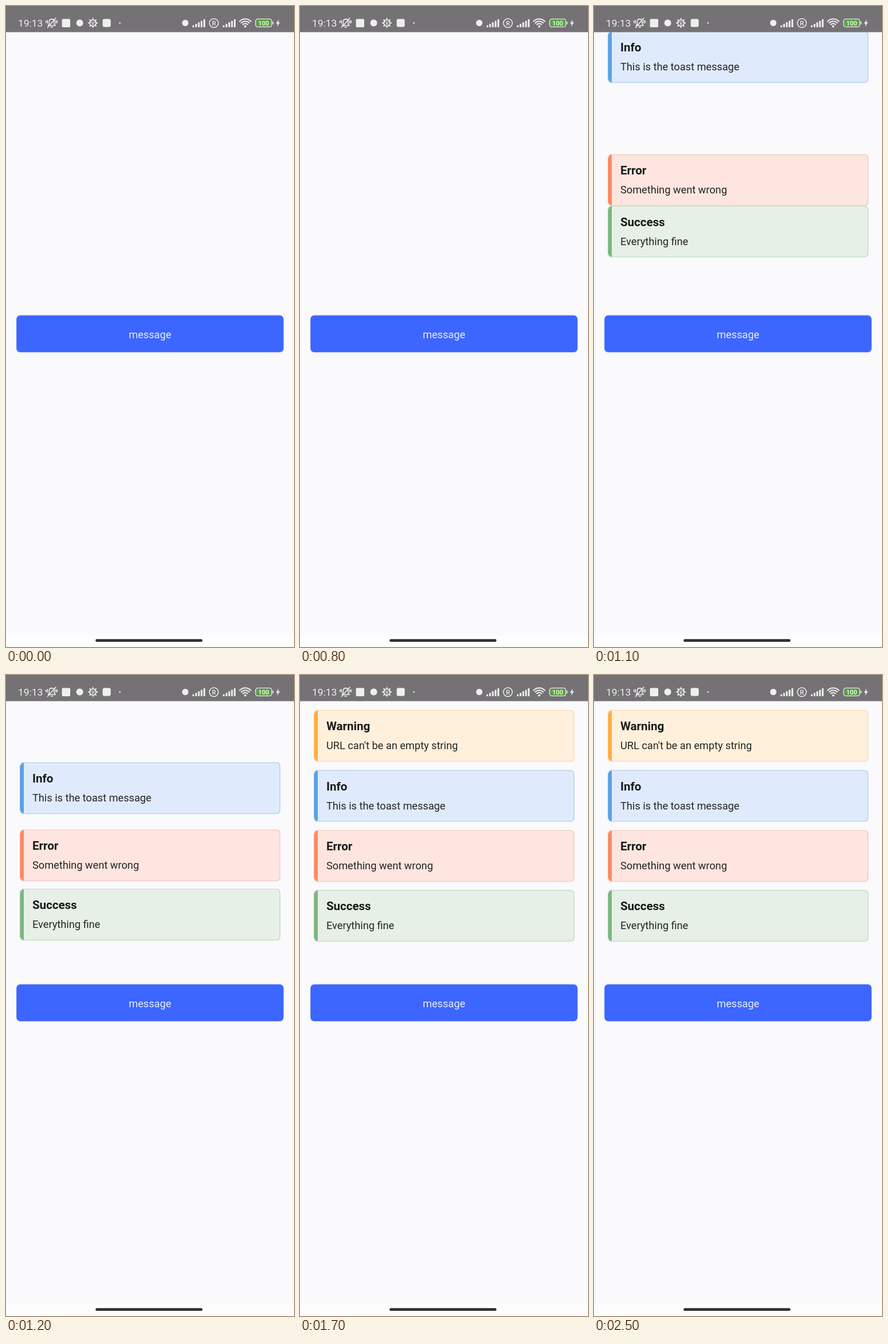
Animation, 502 px wide and 1115 px high, one loop 2.6 s. Source, as an HTML page with a canvas:

```html
<!DOCTYPE html>
<html lang="en">
<head>
<meta charset="utf-8">
<title>Toast messages</title>
<style>
  html, body { margin: 0; width: 100%; height: 100%; overflow: hidden; background: #faf9fc; }
  canvas { display: block; width: 502px; height: 1115px; }
</style>
</head>
<body>
<canvas id="stage"></canvas>
<script>
const W = 502, H = 1115, LOOP = 2600, STEP = 100;
const FONT = 'Roboto, Arial, sans-serif';
const canvas = document.getElementById('stage');
const ratio = window.devicePixelRatio || 1;
canvas.width = W * ratio;
canvas.height = H * ratio;
const ctx = canvas.getContext('2d');
ctx.scale(ratio, ratio);

// path: top edge at each step from `from` on; the last value is where it rests
const toasts = [
  { title: 'Success', text: 'Everything fine', fill: '#e6f0e7', bar: '#7cb681', edge: '#b9d9bc', from: 9, path: [112, 262, 347.5, 372, 374] },
  { title: 'Error', text: 'Something went wrong', fill: '#fee5df', bar: '#fb8a62', edge: '#efc5b0', from: 9, path: [-30, 149.5, 258, 269, 270] },
  { title: 'Info', text: 'This is the toast message', fill: '#dfebfd', bar: '#58a2e8', edge: '#a9cbea', from: 10, path: [-60, 44, 152, 165.5] },
  { title: 'Warning', text: "URL can't be an empty string", fill: '#fff0db', bar: '#ffad40', edge: '#f3d9ae', from: 12, path: [-52, 41, 59.5, 61] }
];

function box(x, y, w, h, r) {
  ctx.beginPath();
  ctx.roundRect(x, y, w, h, r);
}

function fillBox(x, y, w, h, r, color) {
  box(x, y, w, h, r);
  ctx.fillStyle = color;
  ctx.fill();
}

function disc(x, y, r) {
  ctx.beginPath();
  ctx.arc(x, y, r, 0, Math.PI * 2);
  ctx.fill();
}

function ring(x, y, r) {
  ctx.beginPath();
  ctx.arc(x, y, r, 0, Math.PI * 2);
  ctx.stroke();
}

function line(...pts) {
  ctx.beginPath();
  for (let i = 0; i < pts.length; i += 2) ctx.lineTo(pts[i], pts[i + 1]);
  ctx.stroke();
}

function label(str, x, y, size, color, weight = 400, align = 'left') {
  ctx.font = `${weight} ${size}px ${FONT}`;
  ctx.textAlign = align;
  ctx.fillStyle = color;
  ctx.fillText(str, x, y);
}

function drawToast(toast, step) {
  if (step < toast.from) return;
  const { path } = toast;
  const y = path[Math.min(step - toast.from, path.length - 1)];
  fillBox(24.5, y, 453.5, 89.5, 6, toast.fill);
  ctx.save();
  box(24.5, y, 453.5, 89.5, 6);
  ctx.clip();
  ctx.fillStyle = toast.bar;
  ctx.fillRect(24, y, 7, 90);
  ctx.restore();
  box(25, y + 0.5, 452.5, 88.5, 6);
  ctx.strokeStyle = toast.edge;
  ctx.lineWidth = 1.2;
  ctx.stroke();
  ctx.fillStyle = toast.bar;
  ctx.fillRect(24.5, y + 6, 6.5, 77.5);
  label(toast.title, 46, y + 35.3, 20.5, '#191919', 700);
  label(toast.text, 46, y + 68.3, 18.18, '#242424');
}

function drawBell() {
  ctx.lineWidth = 1.6;
  ctx.beginPath();
  ctx.moveTo(73.5, 34);
  ctx.lineTo(75.3, 31.5);
  ctx.lineTo(75.3, 27);
  ctx.bezierCurveTo(75.5, 21.5, 84, 21.5, 84.2, 27);
  ctx.lineTo(84.2, 31.5);
  ctx.lineTo(86, 34);
  ctx.closePath();
  ctx.stroke();
  line(78, 36.8, 81.5, 36.8);
  line(72.5, 37.5, 86.8, 21);
  line(72.2, 25, 72.2, 30);
  line(69.6, 26, 69.6, 29);
  line(87, 25, 87, 30);
  line(89.4, 26, 89.4, 29);
}

function drawGear() {
  ctx.lineWidth = 1.8;
  ring(151.5, 29.5, 5.4);
  for (let i = 0; i < 8; i++) {
    const a = i * Math.PI / 4, c = Math.cos(a), s = Math.sin(a);
    line(151.5 + c * 5.8, 29.5 + s * 5.8, 151.5 + c * 7.8, 29.5 + s * 7.8);
  }
  ctx.lineWidth = 1.2;
  line(147, 28, 156, 28);
  disc(151.5, 31, 1.6);
}

function drawSignal(x) {
  for (let i = 0; i < 5; i++) {
    const h = 3.5 + i * 2.6;
    fillBox(x + i * 4.8, 37 - h, 3, h, 1, '#f0eff0');
  }
}

function drawWifi() {
  ctx.lineWidth = 2.1;
  for (const r of [5.5, 9.5, 13.5]) {
    ctx.beginPath();
    ctx.arc(417, 36, r, -Math.PI * 0.76, -Math.PI * 0.24);
    ctx.stroke();
  }
  disc(417, 35.5, 2);
}

function drawBattery() {
  box(435.2, 22.6, 28, 13.8, 4);
  ctx.lineWidth = 1.4;
  ctx.stroke();
  fillBox(437.2, 24.6, 24, 9.8, 2.2, '#4cae2e');
  label('100', 449.2, 33.5, 11, '#f4fff0', 500, 'center');
  fillBox(464.6, 27, 1.7, 5, 0.8, '#e8e7e8');
  ctx.fillStyle = '#f0eff0';
  ctx.beginPath();
  for (const [x, y] of [[475.5, 23.5], [470.5, 30.5], [473.4, 30.5], [472.4, 36], [477.6, 28.6], [474.5, 28.6]]) ctx.lineTo(x, y);
  ctx.fill();
}

function drawStatusBar() {
  const ink = '#f0eff0';
  ctx.fillStyle = '#747274';
  ctx.fillRect(0, 0, W, 45.5);
  label('19:13', 21, 36, 17.4, ink);
  ctx.strokeStyle = ctx.fillStyle = ink;
  ctx.lineCap = ctx.lineJoin = 'round';
  drawBell();
  fillBox(97.5, 22.5, 14.5, 14.5, 2, ink);
  disc(128.5, 29.5, 6);
  drawGear();
  fillBox(168.5, 22.5, 14, 14, 3, ink);
  disc(198.5, 29.5, 1.3);
  disc(312.5, 29.5, 5.5);
  drawSignal(325);
  ctx.lineWidth = 1.5;
  ring(362.3, 29.7, 7.8);
  label('R', 362.4, 33.7, 11, ink, 500, 'center');
  drawSignal(378);
  drawWifi();
  drawBattery();
}

function drawButton() {
  fillBox(17.8, 537.6, 466.4, 65.2, 7, '#a9b8f4');
  fillBox(18.4, 538.4, 465.2, 63.6, 6.5, '#3c66ff');
  label('message', 251, 577.5, 18.18, '#e9edff', 400, 'center');
}

function draw(step) {
  ctx.fillStyle = '#faf9fc';
  ctx.fillRect(0, 0, W, H);
  ctx.fillStyle = '#fdfdfe';
  ctx.fillRect(0, 1094, W, 21);
  drawButton();
  toasts.forEach(toast => drawToast(toast, step));
  drawStatusBar();
  fillBox(156, 1101.3, 186.5, 4.8, 2.4, '#303030');
}

const start = performance.now();
function tick() {
  const t = (performance.now() - start) % LOOP;
  draw(Math.floor(t / STEP));
  requestAnimationFrame(tick);
}
tick();
</script>
</body>
</html>
```
